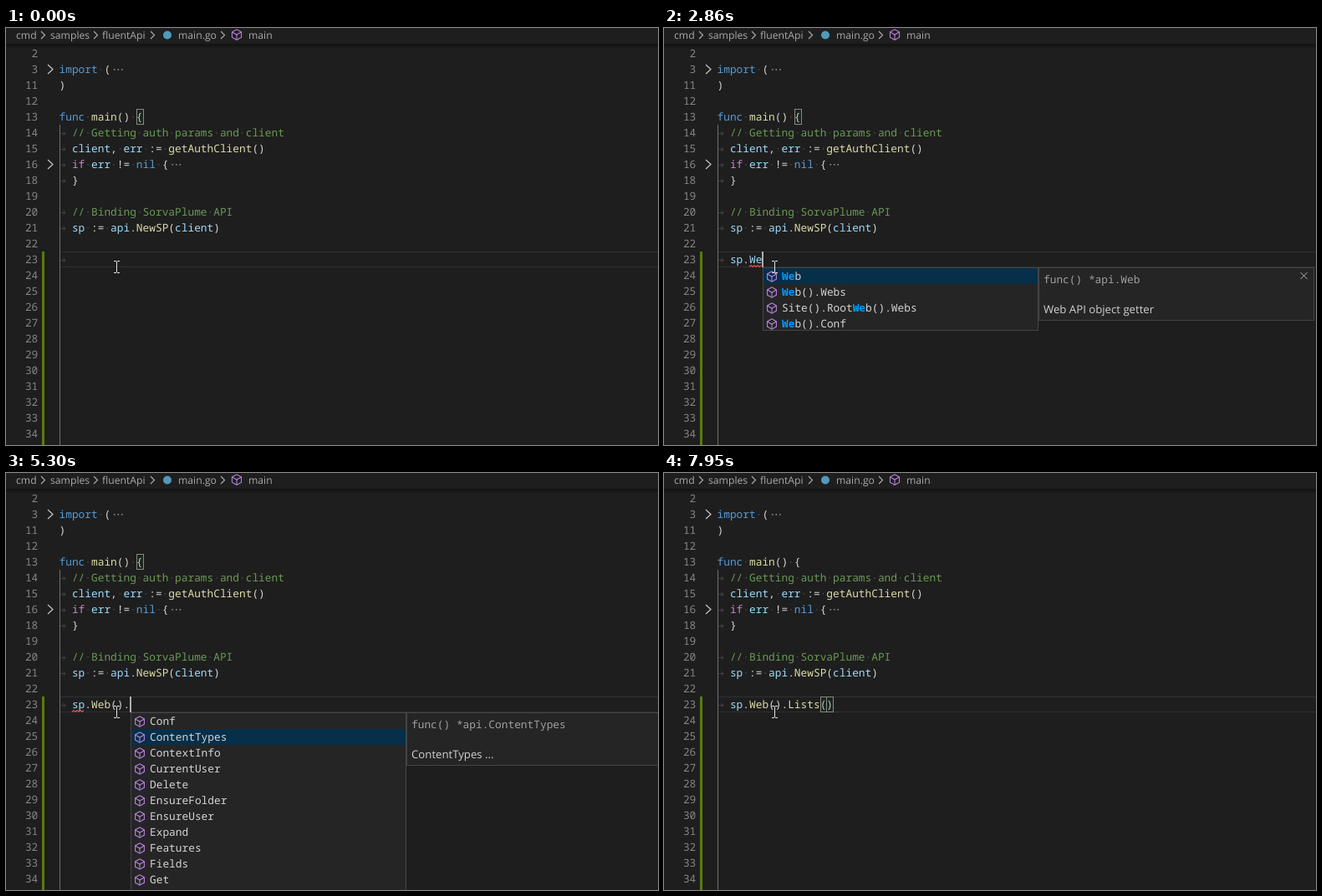
Animation of 780 by 500 pixels, one loop 8 s. Source, as an HTML page with a canvas:

```html
<!DOCTYPE html>
<html lang="en">
<head>
<meta charset="utf-8">
<title>Editor completion</title>
<style>
html, body { margin: 0; width: 100%; height: 100%; overflow: hidden; background: #1e1e1e; }
canvas { display: block; }
</style>
</head>
<body>
<canvas id="stage" width="780" height="500"></canvas>
<script>
const ctx = document.getElementById('stage').getContext('2d');
const LOOP = 8000, ROW = 19, TOP = 21, LEFT = 63.5, CHAR = 7.697;
const MONO = '12.83px "Noto Sans Mono", "DejaVu Sans Mono", monospace';
const UI = '"Open Sans", "Noto Sans", sans-serif';
const C = {
  key: '#569cd6', ctl: '#c586c0', fn: '#dcdcaa', id: '#9cdcfe', txt: '#d4d4d4',
  note: '#6a9955', faint: '#3e3e3e', num: '#858585', cube: '#b180d7', hit: '#0097fb'
};

// row index -> [indent, colour, text, colour, text, ...]
const code = {
  1: [0, 'key', 'import', 'txt', ' ('],
  2: [0, 'txt', ')'],
  4: [0, 'key', 'func', 'fn', ' main', 'txt', '() {'],
  5: [2, 'note', '// Getting auth params and client'],
  6: [2, 'id', 'client', 'txt', ', ', 'id', 'err', 'txt', ' := ', 'fn', 'getAuthClient', 'txt', '()'],
  7: [2, 'ctl', 'if', 'id', ' err', 'txt', ' != ', 'key', 'nil', 'txt', ' {'],
  8: [2, 'txt', '}'],
  10: [2, 'note', '// Binding SorvaPlume API'],
  11: [2, 'id', 'sp', 'txt', ' := ', 'id', 'api', 'txt', '.', 'fn', 'NewSP', 'txt', '(', 'id', 'client', 'txt', ')']
};
const lineNumbers = [2, 3, 11, 12, 13, 14, 15, 16, 18];
while (lineNumbers.length < 25) lineNumbers.push(lineNumbers.length + 10);

const lists = {
  s: ['sp', 'string', 'struct', 'switch', 'select', 'strings', 'strconv', 'sort', 'sync', 'syscall', 'signal', 'sql'],
  sp: ['sp'],
  api: ['Conf', 'ContextInfo', 'Profiles', 'Search', 'Site', 'ToURL', 'Utility', 'Web',
    'Profiles().Conf', 'Profiles().Expand', 'Profiles().Get'],
  we: ['Web', 'Web().Webs', 'Site().RootWeb().Webs', 'Web().Conf'],
  web: ['Conf', 'ContentTypes', 'ContextInfo', 'CurrentUser', 'Delete', 'EnsureFolder',
    'EnsureUser', 'Expand', 'Features', 'Fields', 'Get', 'GetFile'],
  li: ['Lists', 'Lists().Add', 'Lists().AddWithURI', 'Lists().Conf', 'GetList']
};
const conf = 'func(config *api.RequestConfig) *api.';

// typed text, underline columns, popup list, matched prefix, selected row, signature, description
const steps = [
  { at: 0, text: '' },
  { at: 430, text: 's', wave: [2, 3], list: 's', hit: 's', sig: ['var sp *api.SP'], doc: '' },
  { at: 650, text: 'sp', wave: [2, 4], list: 'sp', hit: 'sp', sig: ['var sp *api.SP'], doc: '' },
  { at: 1050, text: 'sp.', wave: [2, 4], list: 'api', sig: [conf + 'S', 'P'], doc: 'Conf ...' },
  { at: 2470, text: 'sp.W', wave: [5, 6], list: 'we', hit: 'W', sig: ['func() *api.Web'], doc: 'Web API object getter' },
  { at: 2860, text: 'sp.We', wave: [5, 7], list: 'we', hit: 'We', sig: ['func() *api.Web'], doc: 'Web API object getter' },
  { at: 3480, text: 'sp.Web()' },
  { at: 4280, text: 'sp.Web().', wave: [2, 4], list: 'web', sig: [conf + 'W', 'eb'], doc: 'Conf ...' },
  { at: 5300, text: 'sp.Web().', wave: [2, 4], list: 'web', sel: 1, sig: ['func() *api.ContentTypes'], doc: 'ContentTypes ...' },
  { at: 5510, text: 'sp.Web().', wave: [2, 4], list: 'web', sel: 2, sig: ['func() (*api.ContextInfo, error)'], doc: 'ContextInfo ...' },
  { at: 5730, text: 'sp.Web().', wave: [2, 4], list: 'web', sel: 3, sig: ['func() *api.User'], doc: 'CurrentUser ...' },
  { at: 6310, text: 'sp.Web().L', wave: [11, 12], list: 'li', hit: 'L', sig: ['func() *api.Lists'], doc: 'Lists ...' },
  { at: 6530, text: 'sp.Web().Li', wave: [11, 13], list: 'li', hit: 'Li', sig: ['func() *api.Lists'], doc: 'Lists ...' },
  { at: 7550, text: 'sp.Web().Lists()' }
];
const caretOn = [[430, 1450], [2060, 3260], [3480, 3880], [4280, 4680], [5300, 5730], [6310, 6930], [7550, 7950]];

const colX = col => LEFT + col * CHAR;
const rowY = row => TOP + row * ROW;

function rect(x, y, w, h, color) {
  ctx.fillStyle = color;
  ctx.fillRect(x, y, w, h);
}

function frame(x, y, w, h, color) {
  ctx.strokeStyle = color;
  ctx.lineWidth = 1;
  ctx.strokeRect(x + .5, y + .5, w - 1, h - 1);
}

function text(str, x, y, color, font = MONO) {
  ctx.font = font;
  ctx.fillStyle = color;
  ctx.fillText(str, x, y);
}

function path(points, color, width = 1) {
  ctx.strokeStyle = color;
  ctx.lineWidth = width;
  ctx.beginPath();
  for (const [x, y] of points) ctx.lineTo(x, y);
  ctx.stroke();
}

function chevron(x, y, w, h, color) {
  path([[x, y - h], [x + w, y], [x, y + h]], color, 1.2);
}

function cube(x, y, r, color) {
  const w = r * .88, h = r / 2;
  path([[x, y - r], [x + w, y - h], [x + w, y + h], [x, y + r], [x - w, y + h], [x - w, y - h], [x, y - r]], color, 1.1);
  path([[x - w, y - h], [x, y], [x + w, y - h]], color, 1.1);
  path([[x, y], [x, y + r]], color, 1.1);
}

function tabArrow(row) {
  const y = rowY(row) + 10.5;
  path([[65.5, y], [71, y]], '#444444');
  path([[68.5, y - 2.5], [71, y], [68.5, y + 2.5]], '#444444');
}

function codeRun(str, col, row, color) {
  text(str, colX(col), rowY(row) + 14, color);
  [...str].forEach((ch, i) => {
    if (ch === ' ') rect(colX(col + i) + 3, rowY(row) + 9, 1.5, 1.5, '#484848');
  });
}

function bracket(col, row) {
  const x = Math.round(colX(col)), w = Math.round(colX(col + 1)) - x + 1;
  rect(x, rowY(row), w, ROW, 'rgba(0,100,0,.1)');
  frame(x, rowY(row), w, ROW, '#888888');
}

function breadcrumb() {
  const grey = '#a9a9a9', font = '12.2px ' + UI;
  [['cmd', 12], ['samples', 53], ['fluentApi', 115], ['main.go', 206], ['main', 290]]
    .forEach(([str, x]) => text(str, x, 13, grey, font));
  for (const x of [42, 105, 173, 257]) chevron(x, 8.5, 4.5, 4.5, grey);
  ctx.fillStyle = '#519aba';
  ctx.beginPath();
  ctx.arc(193, 8.5, 5, 0, Math.PI * 2);
  ctx.fill();
  cube(276, 8, 6.3, C.cube);
  const shade = ctx.createLinearGradient(0, 19, 0, 25);
  shade.addColorStop(0, 'rgba(0,0,0,.45)');
  shade.addColorStop(1, 'rgba(0,0,0,0)');
  rect(0, 19, 780, 6, shade);
}

function editor() {
  rect(0, 0, 780, 500, '#1e1e1e');
  breadcrumb();
  rect(64, 268, 716, 1, '#303030');
  rect(64, 286, 716, 1, '#303030');
  rect(43, 268, 3, 232, '#587c0c');
  rect(64, 116, 1, 384, '#707070');

  ctx.textAlign = 'right';
  lineNumbers.forEach((n, i) => text(n, 38.3, rowY(i) + 14, C.num));
  ctx.textAlign = 'left';

  for (const row of [1, 7]) chevron(50, rowY(row) + 9.5, 6, 5.5, '#c5c5c5');
  for (const [x, row] of [[129, 1], [198.5, 7]])
    for (let i = 0; i < 3; i++) rect(x + i * 4.5, rowY(row) + 9, 1.6, 1.6, '#8c8c8c');

  for (const row in code) {
    let [col, ...runs] = code[row];
    if (col) tabArrow(+row);
    for (let i = 0; i < runs.length; i += 2) {
      codeRun(runs[i + 1], col, +row, C[runs[i]]);
      col += runs[i + 1].length;
    }
  }
  tabArrow(13);
}

function typedLine(step) {
  let col = 2;
  const parts = step.text.match(/\w+|\W/g) || [];
  parts.forEach((part, i) => {
    const color = !/\w/.test(part) ? C.txt : parts[i + 1] === '(' ? C.fn : C.id;
    codeRun(part, col, 13, color);
    col += part.length;
  });
  if (step.text.endsWith(')')) {
    bracket(col - 2, 13);
    bracket(col - 1, 13);
  } else {
    bracket(12, 4);
  }
  if (step.wave) {
    const [from, to] = step.wave.map(c => Math.round(colX(c)));
    const zigzag = [];
    for (let x = from; x <= to; x += 2) zigzag.push([x, (x - from) % 4 ? 284.5 : 286.5]);
    path(zigzag, '#f14c4c', 1.1);
  }
}

function itemIcon(list, name, x, y) {
  if (name === 'sp') text('[]', x - 7, y + 4, '#75beff');
  else if (list === 's') text('{}', x - 7, y + 4, '#c5c5c5');
  else cube(x, y, 6.2, C.cube);
}

function popup(step, t) {
  const x = Math.ceil(colX(step.text.length + 2)), y = 287;
  const items = lists[step.list], h = items.length * ROW;
  rect(x, y, 330, h, '#252526');
  rect(x + 1, y + 1 + (step.sel || 0) * ROW, 328, ROW, '#062f4a');
  items.forEach((name, i) => {
    const top = y + 1 + i * ROW, base = top + 14;
    itemIcon(step.list, name, x + 11, top + 10);
    text(name, x + 23, base, C.txt);
    const at = step.hit ? name.indexOf(step.hit) : -1;
    if (at >= 0) {
      const hx = x + 23 + at * CHAR, hw = step.hit.length * CHAR;
      rect(hx, top, hw, ROW - 1, i === (step.sel || 0) ? '#062f4a' : '#252526');
      text(step.hit, hx, base, C.hit, 'bold ' + MONO);
    }
  });
  if (t >= 4280 && t < 4500) rect(468, 288, 10, 91, 'rgba(121,121,121,.1)');
  else if (t >= 4500 && t < 5110) rect(468, 288, 10, ROW, 'rgba(121,121,121,.03)');
  frame(x, y, 330, h, '#454545');
  details(step, x + 330, y);
}

function details(step, x, y) {
  const h = 45 + ROW * step.sig.length;
  rect(x, y, 330, h, '#252526');
  frame(x, y, 330, h, '#454545');
  step.sig.forEach((line, i) => text(line, x + 6, y + 19 + i * ROW, '#a0a0a0'));
  text(step.doc, x + 6, y + 36 + ROW * step.sig.length, '#d0d0d0', '13.2px ' + UI);
  const cx = x + 317.5, cy = y + 10;
  path([[cx - 4, cy - 4], [cx + 4, cy + 4]], '#b0b0b0');
  path([[cx + 4, cy - 4], [cx - 4, cy + 4]], '#b0b0b0');
}

function pointer() {
  const ink = '#e4e4e4';
  rect(132, 280, 1, 13, ink);
  for (const y of [279, 293]) {
    rect(129, y, 3, 1, ink);
    rect(133, y, 3, 1, ink);
  }
}

function draw(t) {
  const step = steps.findLast(s => s.at <= t);
  editor();
  typedLine(step);
  if (caretOn.some(([a, b]) => t >= a && t < b))
    rect(Math.floor(colX(step.text.length + 2)), 268, 2, ROW, '#aeafad');
  if (step.list) popup(step, t);
  pointer();
}

ctx.textRendering = 'geometricPrecision';
const start = performance.now();
function tick() {
  draw((performance.now() - start) % LOOP);
  requestAnimationFrame(tick);
}
tick();
</script>
</body>
</html>
```
